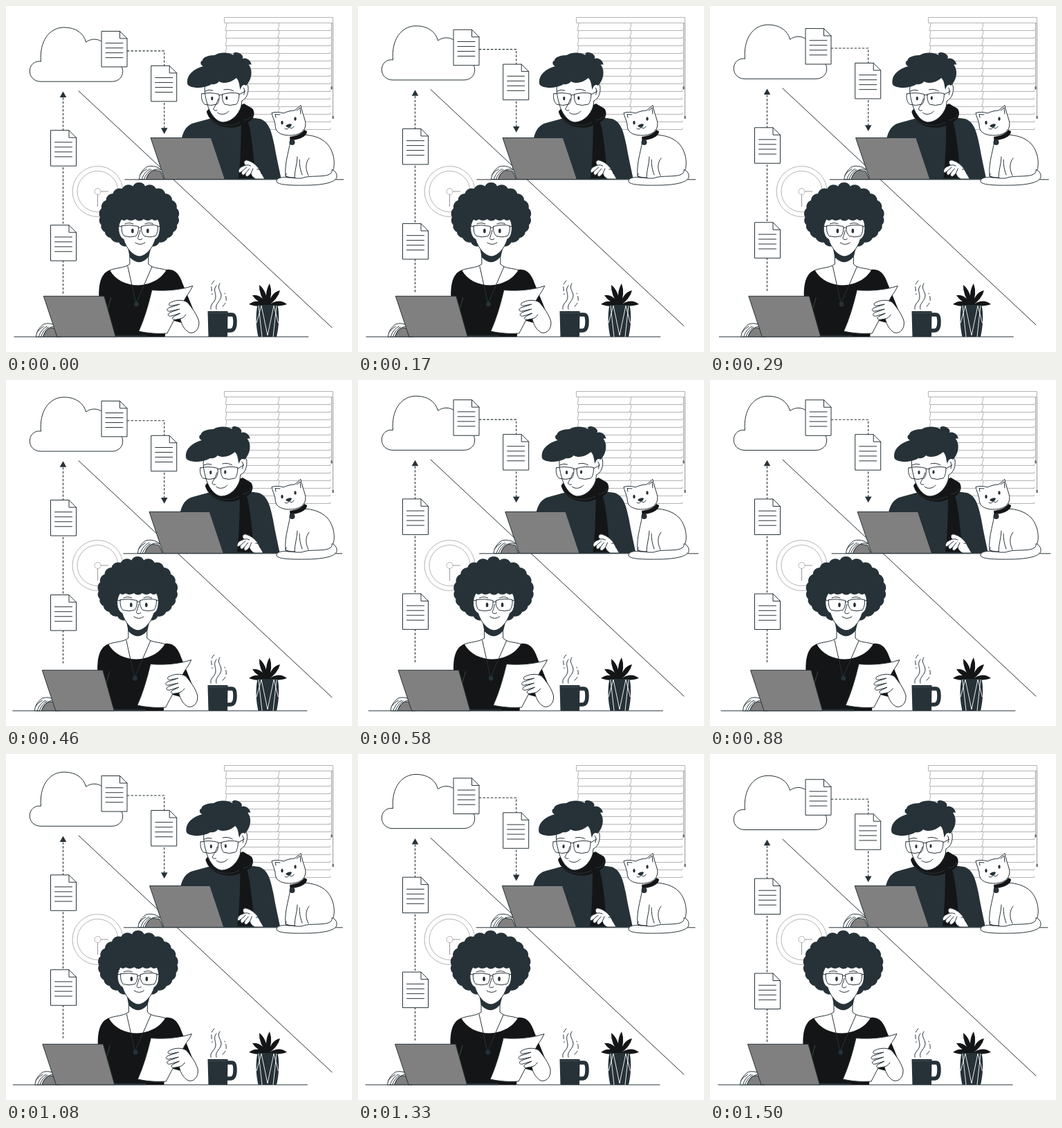
An HTML page that plays this animation: 500 by 500 pixels, repeating every 1540 ms.

```html
<!DOCTYPE html>
<html lang="en">
<head>
<meta charset="utf-8">
<title>Sharing documents through the cloud</title>
<style>
html, body { margin: 0; width: 100%; height: 100%; overflow: hidden; background: #fff; }
svg { display: block; width: 100vw; height: 100vh; }
.l { fill: none; stroke: #263238; stroke-width: 1; stroke-linecap: round; stroke-linejoin: round; }
.w { fill: #fff; stroke: #263238; stroke-width: 1; stroke-linejoin: round; }
.d { fill: #263238; }
.k { fill: #141516; }
.g { fill: #808080; stroke: #263238; stroke-width: 1; stroke-linejoin: round; }
.p { fill: none; stroke: #b4b4b4; stroke-width: 1; }
.dash { fill: none; stroke: #263238; stroke-width: 1.1; stroke-dasharray: 3.4 2.2; }
</style>
</head>
<body>
<svg viewBox="0 0 500 500">
  <defs>
    <g id="hand">
      <path class="g" d="M10 20C13 13 17 8 21 7L31 8L36 20Z"/>
      <path class="w" d="M0 20C1 12 5 6 11 2C15 0 25 0 32 6C27 5 23 5 20 7C15 9 12 14 10 20Z"/>
      <path class="l" d="M4 20C6 13 10 8 16 5M7 20C9 14 13 9 18 6M1 14Q5 8 11 5"/>
    </g>
  </defs>

  <g id="blinds">
    <path class="p" d="M315.5 16.5H472.5V24.5H315.5Z"/>
    <path d="M470.5 24.5V117M472.5 24.5V160" stroke="#9a9a9a" fill="none"/>
    <path d="M469.5 116.5h2v4h-2zM471.600 159h2v4h-2z" fill="#555"/>
  </g>

  <g class="p">
    <circle cx="132.500" cy="268" r="36.500"/>
    <circle cx="132.500" cy="268" r="29.500"/>
    <circle cx="132.500" cy="268" r="4.500"/>
    <path d="M132.500 272.500V290M137 268H148" stroke="#999"/>
  </g>

  <g id="float">
    <path class="l" d="M105 123.200L471 465"/>
    <path class="w" d="M50 109.500C41 109.500 34.300 103 34.300 94.500C34.300 85.500 41.500 79 50.500 80.500C48 52 62 31.300 84 31.300C101 31.300 112.500 40 115.500 52.500C123 47 133 47 140 53C152 58 156.500 69 156.500 80.500C164 82.500 168.700 88 168.700 95C168.700 103.500 162 109.500 153 109.500Z"/>
    <path class="dash" d="M175 65.200H228.700V178M82.500 416V131"/>
    <path class="d" d="M224 176.500H233.500L228.700 185.300ZM77.700 132.300H87.300L82.500 123.800Z"/>
    <g id="docs"></g>
  </g>

  <g class="desk">
    <path class="l" d="M172 250.800H488"/>
    <path class="d" d="M252 250L254 191C257 180 261 172 272 169L294 163L345 160L367 163C380 167 384 181 388 201C391 219 395 236 398 250.500Z"/>
    <path class="k" d="M291 151C296 142 336 147 344 141L356 148C362 155 357 165 350 168C354 177 358 214 361 250H336C339 224 340 196 340 172C333 177 318 177 307 172C297 167 292 160 290 153Z"/>
    <path d="M293 160C303 172 323 177 339 168M344 165Q354 164 357 156" fill="none" stroke="#3b474d" stroke-width=".6"/>
    <path class="w" d="M288 112C286 125 289 134 292 145C296 157 304 167 313 168C325 168 336 158 340 145L341 137C348 134 351 125 350 116C348 109 342 110 340 115L336 100L300 104Z"/>
    <path class="d" d="M262 110C262 99 271 91 285 87C280 85 281 79 284 79C284 74 293 71 302 71C311 66 322 67 329 71C327 66 335 66 339 69C343 72 343 74 342 76C347 74 354 78 355 85C353 84 351 85 351 85C357 92 356 106 347 115C343 112 340 116 339 121C337 116 338 109 333 104C325 111 315 113 308 109C305 113 300 114 297 113C289 118 275 120 266 116C263 115 262 113 262 110Z"/>
    <path class="l" d="M283 127Q295 124 308 127.500C309 133 308 139 305 142Q296 145 287 142C283 138 282 132 283 127ZM313 127.500Q325 124 337 126.500C337 133 336 139 333 142Q324 145 316 142C313 138 312 132 313 127.500ZM308 129Q310.500 127 313 129M337 128L346 123"/>
    <path class="l" stroke-width="1.400" d="M288 123Q293 120 299 122M315 121Q323 119 329 123"/>
    <ellipse class="d" cx="298" cy="133.500" rx="1.600" ry="2.800"/>
    <ellipse class="d" cx="319" cy="133" rx="1.600" ry="2.800"/>
    <path class="l" d="M307 134C305 141 301 146 300 149Q301 152 305 151M306 154C310 158 318 157 322 152M343 118Q346 119 344 128"/>
    <path d="M314 249.800H363" stroke="#263238" stroke-width="2" fill="none"/>
    <path class="w" d="M337 236C339 232 343 232 346 230C342 226 345 222 349 223C356 225 361 229 365 234L374 250H361C357 248 355 245 354 242L350 246C347 247 345 245 347 241L344 244C341 245 340 242 341 239L338 241Q335 240 337 236Z"/>
    <path class="l" d="M341 239L348 233M347 241L352 235M354 242L357 235M346 230Q351 229 354 231M363 236L369 236V242"/>
    <use href="#hand" x="192.500" y="230.500"/>
    <path class="g" d="M209.200 190.500H296.500L316.500 250.400H229.500Z"/>
  </g>

  <g>
    <path class="w" d="M411 190C411 206 402 224 404 246L420 250L468 247C479 232 474 210 464 199C454 189 442 187 431 186Z"/>
    <path class="w" d="M419 249C405 246 391 247 391 253C391 258.500 410 259.500 436 259C462 258.500 478.500 254 478 246C478 241 475 238 471 236.500C472 241 468 244 462 245C448 247 436 245 427 249Z"/>
    <path class="l" d="M421 218C421 228 417 237 417 248M405 242Q403 248 408 248H418M438 220C432 227 433 237 437 245M424 222Q424 234 428 244"/>
    <path class="w" d="M389 171C388 166 385 160 384 154.500C389 153 395 153 401 155C406 152.500 412 151 417 151L426 143.500C427 150 430 158 432 165C435 175 430 182 422 185C411 189 396 187 391 180C389 176 389 173 389 171Z"/>
    <path class="l" d="M390 161L389 156.500L396 157M420 151L425 147L426 156M409 175Q407 180 403 177M409 175Q413 179 416 174"/>
    <ellipse class="d" cx="399" cy="168.500" rx="1.700" ry="2.800"/>
    <ellipse class="d" cx="418" cy="163" rx="1.700" ry="2.800"/>
    <path class="d" d="M404 173Q409 169 413 171Q412 175 409 175.500Q406 176 404 173Z"/>
    <path class="k" d="M410 189C419 188 427 185 431 179L435 181C435 189 422 194 411 194Z"/>
    <circle class="d" cx="413.500" cy="197" r="4"/>
  </g>

  <g class="desk">
    <path class="l" d="M12 478H437"/>
    <path id="afro" class="d"/>
    <path class="w" d="M179 350V373C171 379 159 378 150 382L160 405H222L233 382C222 378 213 380 206 373V350Z"/>
    <path class="k" d="M134.500 420C134 400 138 386 150 381.500C158 396 174 403.500 191 403.500C209 403 225 394 232 381C244 379 251 388 255 400L275 449L262 460L232 452L230 478H130Z"/>
    <path class="d" d="M176 348H210L206.500 362Q193 378 179 363Z"/>
    <path class="w" d="M167 308C163 314 161 323 165 332Q167 336 170 337C174 350 183 361 193 362C203 361 212 350 216 337Q222 334 222.500 323C223 315 221 309 218 307Z"/>
    <path class="d" d="M163 314C162 298 225 298 224 314L220 308Q216 312 211 308Q205 312 199 308Q193 313 187 308Q180 312 175 308Q170 312 167 308Z"/>
    <path class="l" d="M167.500 317.500Q179 315.500 191.500 318.500C192 324 191 329 188 332.500Q180 335 171 332.500C167 328 167 322 167.500 317.500ZM196 318.500Q208 315 219.500 317.500C220 323 219 329 216 332.500Q208 335 200 332.500C196 328 195 323 196 318.500ZM191.500 321Q193.500 319 196 321M167 319L163 318M219.500 319L223 318"/>
    <path class="l" d="M172 315Q178 312 184 315M201 315Q207 312 213 315M194 324C193 330 190 335 191 336.500Q193 339 197 336.500M187 342Q194 347 201 342"/>
    <ellipse class="d" cx="183" cy="325" rx="1.800" ry="3.200"/>
    <ellipse class="d" cx="205" cy="325" rx="1.800" ry="3.200"/>
    <path class="l" d="M176 376L188 430L211 377" stroke-width=".8"/>
    <circle class="d" cx="188.700" cy="431" r="3.400"/>
    <path d="M152 421L146 442" fill="none" stroke="#555" stroke-width=".7"/>
    <path d="M156 477H204" stroke="#263238" stroke-width="2.400" fill="none"/>
    <path class="w" d="M211 410.500C228 412 250 411 270 404.500C266 414 260 419 257 427L233 473C220 474 205 473 192 470C200 452 206 432 211 410.500Z"/>
    <path class="w" d="M262 428C254 423.500 244 425 237 429C234 432 237 434 240 433L251 431L236 436C231 438 233 442 237 441L251 438L237 443C232 446 235 449 239 448L252 444L242 449C239 452 242 454 246 453L252 452C254 461 258 468 265 472C273 474 280 467 279 456C276 445 268 435 262 428Z"/>
    <path class="l" d="M252 452Q257 451 260 446"/>
    <use href="#hand" x="43.500" y="458"/>
    <path class="g" d="M54.500 419.300H142L158.500 478H74Z"/>
  </g>

  <g>
    <path d="M319 446H326C330 446 331 449 331 457C331 466 328 469 324 469H319" fill="none" stroke="#263238" stroke-width="5.500"/>
    <path class="d" d="M291.500 441H320.500L320 478H292.500Z"/>
    <path d="M293 443.500H319" stroke="#4d5a60" stroke-width=".7"/>
    <path class="l" d="M296 438C294 430 304 428 303 419C302 412 300 409 304 404M304 438C301 430 312 426 311 417C309 410 305 407 309 401"/>
    <path class="l" stroke-dasharray="6 4" d="M301 397C295 402 297 409 298 417M313 434C320 428 319 422 316 415"/>
  </g>

  <g>
    <path id="leaves" class="k"/>
    <path class="d" d="M363.500 432H392.500C395.500 446 394.500 463 391 478H364.500C361 463 360.500 446 363.500 432Z"/>
    <path d="M362 458L369 433L378 476L387 433L393.500 458M365 433L370 478M391 433L386 478" fill="none" stroke="#fff" stroke-width=".9"/>
  </g>
</svg>
<script>
const $ = id => document.getElementById(id);

// window blinds: two columns of touching slats
let slats = '';
for (let i = 0; i < 14; i++) {
  const y = 24.5 + i * 11;
  for (const x of [318, 394]) slats += `M${x + 1} ${y}L${x - 0.500} ${y + 9}V${y + 11}H${x + 74.500}V${y + 9}`;
}
$('blinds').insertAdjacentHTML('afterbegin', `<path class="p" d="${slats}"/>`);

// documents
const doc = (x, y) => `<g transform="translate(${x} ${y})">
  <path class="w" d="M0 0H26.500L37 10.500V51.500H0Z"/>
  <path class="l" d="M26.500 0V10.500H37"/>
  <path class="l" stroke-width="1.200" d="M6 17.200H31M6 24.200H31M6 31.200H31M6 38.200H31"/></g>`;
$('docs').innerHTML =
  [[138, 36.800], [209.700, 86.700], [64.500, 180], [64.500, 317]].map(p => doc(...p)).join('');

// curly hair: arcs around an oval that is fuller below
const curls = 22;
let hair = '';
for (let i = 0; i <= curls; i++) {
  const a = i / curls * 2 * Math.PI;
  const c = Math.cos(a), s = Math.sin(a);
  const x = (192.500 + 56.500 * Math.sign(c) * Math.abs(c) ** (s > 0 ? .75 : .95)).toFixed(1);
  const y = (305 + (s > 0 ? 40 : 45) * s).toFixed(1);
  hair += i ? `A10 10 0 0 1 ${x} ${y}` : `M${x} ${y}`;
}
$('afro').setAttribute('d', hair + 'Z');

// plant leaves: tapered blades from one root
const leaf = (x, y) => {
  const dx = x - 378, dy = y - 434, n = Math.hypot(dx, dy);
  const mx = 378 + dx * .55, my = 434 + dy * .55 - Math.abs(dx) * .16;
  const ox = -dy / n * 7, oy = dx / n * 7;
  return `M378 434Q${mx + ox} ${my + oy} ${x} ${y}Q${mx - ox} ${my - oy} 378 434Z`;
};
$('leaves').setAttribute('d',
  [[351, 431], [356, 418], [366, 403], [381, 401], [396, 411], [406, 431]].map(p => leaf(...p)).join(''));

const LOOP = 1540;
const SHAKE = [0, -1, 2, -4, 4, -4, 4, -4, 2, -1, 0];
const desks = document.querySelectorAll('.desk');

function draw(t) {
  const step = Math.floor((t + 4) * .024);
  const p = Math.min(1, 1 / 60 + step / 36);
  const i = Math.min(9, Math.floor(p * 10));
  const x = SHAKE[i] + (SHAKE[i + 1] - SHAKE[i]) * (p * 10 - i);
  const y = -10 * (1 - Math.abs(1 - 2 * p));
  desks.forEach(d => d.setAttribute('transform', `translate(${x.toFixed(3)} 0)`));
  $('float').setAttribute('transform', `translate(0 ${y.toFixed(3)})`);
}

const start = performance.now();
function tick() {
  draw((performance.now() - start) % LOOP);
  requestAnimationFrame(tick);
}
tick();
</script>
</body>
</html>
```
